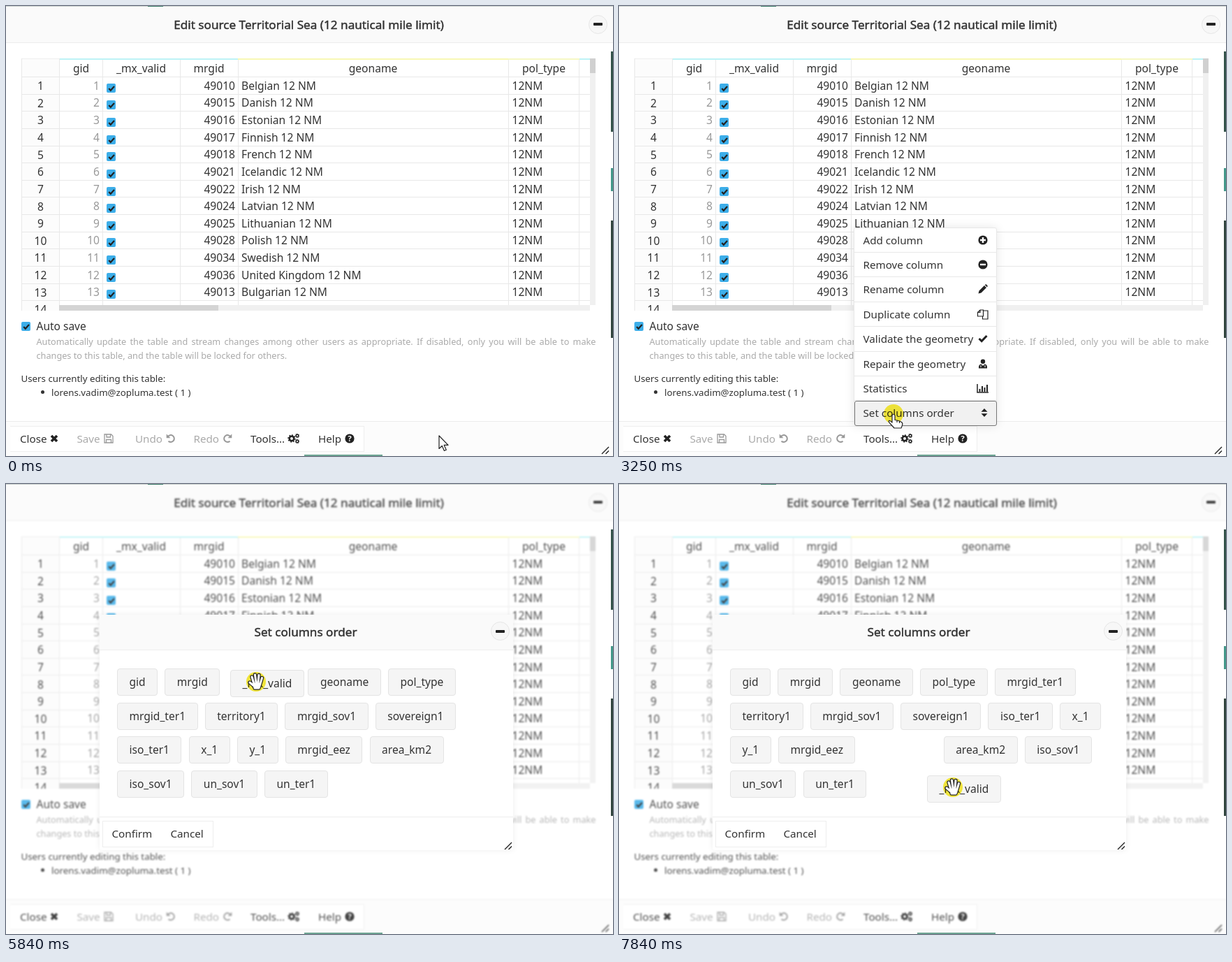
Recreate the animation shown at these times as an HTML page. Size 869x644 px, loop 8 s.

```html
<!DOCTYPE html>
<html lang="en">
<head>
<meta charset="utf-8">
<title>Set columns order</title>
<style>
html, body { margin: 0; width: 100%; height: 100%; overflow: hidden; background: #fff; }
#stage { position: relative; width: 869px; height: 644px; overflow: hidden; color: #333;
  font: 15.6px/24px "Noto Sans", "Open Sans", sans-serif; }
#stage div, #stage svg { position: absolute; box-sizing: border-box; white-space: nowrap; }
#stage svg { overflow: visible; }
.layer { inset: 0; }
.title { font-size: 17.15px; -webkit-text-stroke: .45px #333; }
.small { font-size: 15.2px; }
.check { width: 13px; height: 13px; background: #3daee9; border-radius: 2px; }
.round { border: 1px solid #e6e6e6; border-radius: 50%; background: #f7f7f7; }
.btn { border: 1px solid #eee; border-left-width: 0; background: #fff; }
.chip { height: 39px; line-height: 37px; padding: 0 16.5px; border: 1px solid #e4e4e4;
  border-radius: 4px; background: #f5f5f5; font-size: 15.55px; }
</style>
</head>
<body>
<div id="stage"></div>
<script>
const stage = document.getElementById('stage');

function box(parent, x, y, w, h, css = '', html = '', cls = '') {
  const d = document.createElement('div');
  d.className = cls;
  d.style.cssText = `left:${x}px;top:${y}px;width:${w}px;height:${h}px;${css}`;
  d.innerHTML = html;
  parent.append(d);
  return d;
}

function layer(z) {
  const d = document.createElement('div');
  d.className = 'layer';
  d.style.zIndex = z;
  stage.append(d);
  return d;
}

// y is the vertical middle of the line
function text(parent, x, y, str, align = 'left', css = '', cls = '') {
  const shift = { left: 0, center: 250, right: 500 }[align];
  return box(parent, x - shift, y - 12, 500, 24, `text-align:${align};${css}`, str, cls);
}

function svg(parent, x, y, body, color = '#222') {
  const holder = document.createElement('template');
  holder.innerHTML = `<svg width="1" height="1" style="left:${x}px;top:${y}px;color:${color}">${body}</svg>`;
  const node = holder.content.firstChild;
  parent.append(node);
  return node;
}

const line = (d, w = 1.5) => `<path d="${d}" fill="none" stroke="currentColor" stroke-width="${w}"/>`;
const solid = d => `<path d="${d}" fill="currentColor"/>`;
const disc = `<circle r="6.6" fill="currentColor"/>`;
const gear = (x, y, r) => `<g transform="translate(${x} ${y})" fill="none" stroke="currentColor">
  <circle r="${r * .7}" stroke-width="${r * .55}"/>
  <circle r="${r}" stroke-width="${r * .5}" pathLength="16" stroke-dasharray="1 1"/></g>`;
const turn = line('M-4.4 -2.6A5 5 0 1 1 -3.5 3.8', 2) + solid('M-6.3 -6.5V-.8H-.6Z');

const icons = {
  close: line('M-4 -4L4 4M4 -4L-4 4', 3.6),
  save: line('M-6 -6H3.5L6 -3.5V6H-6ZM-3 -6V-2H2.5V-6M-3.5 6V1.5H3.5V6', 1.3),
  undo: turn,
  redo: `<g transform="scale(-1 1)">${turn}</g>`,
  tools: gear(-3, 0, 4.6) + gear(5, -4, 2.5) + gear(5, 4, 2.5),
  help: disc + '<text y="4" font-size="11" font-weight="700" text-anchor="middle" fill="#fff">?</text>',
  add: disc + '<path d="M-4 0H4M0 -4V4" stroke="#fff" stroke-width="2.4"/>',
  remove: disc + '<path d="M-4 0H4" stroke="#fff" stroke-width="2.4"/>',
  rename: solid('M-6.5 6.5L-5.5 2.5L2 -5L5 -2L-2.5 5.5ZM2.8 -5.8L4.3 -7L7 -4.3L5.8 -2.8Z'),
  copy: line('M-7.5 -2.5L-4 -6H.5V3H-7.5ZM-4 -6V-2.5H-7.5M-.5 3V7H7V-5H.5', 1.2),
  check: line('M-5.5 0L-1.8 3.6L5.5 -4', 3),
  repair: '<circle cy="-3.2" r="3.2" fill="currentColor"/>' +
    solid('M-6 6.5Q-6.5 1 -2.5 .5L0 3L2.5 .5Q6.5 1 6 6.5Z') +
    '<path d="M-3 2V5M3 2V5" stroke="#fff"/>',
  stats: line('M-8 -6V6H8') + line('M-4.5 5V1M-1 5V-3M2.5 5V-1M6 5V-5', 2),
  order: solid('M-4.5 -1.3L0 -6L4.5 -1.3ZM-4.5 1.3L0 6L4.5 1.3Z')
};

const tick = (parent, x, y) => svg(box(parent, x, y, 13, 13, '', '', 'check'), 6.5, 6.5,
  line('M-3.8 0L-1.2 2.8L4 -3', 2.2));

function minusButton(parent, x, y) {
  box(parent, x - 13.5, y - 13.5, 27, 27, '', '', 'round');
  box(parent, x - 6.5, y - 2, 13, 4, 'background:#222;border-radius:1px');
}

const grip = (parent, x, y) => svg(parent, x, y, line('M0 10L10 0M5.5 10L10 5.5', 1.4));
const fill = (parent, x, y, w, h, color) => box(parent, x, y, w, h, 'background:' + color);

// Main window
const main = layer(1);
fill(main, 0, 0, 869, 52, '#fafafa');
fill(main, 0, 52, 869, 1, '#ececec');
text(main, 433.5, 27.2, 'Edit source Territorial Sea (12 nautical mile limit)', 'center', '', 'title');
minusButton(main, 847, 26);

const table = box(main, 22, 75, 822, 361, 'overflow:hidden');
const grid = box(table, -22, -75, 869, 644);
const rowTop = i => 102 + 24.63 * i;
fill(grid, 22, 75, 54, 361, '#fcfcfc');
fill(grid, 22, 75, 814, 1, '#eee');
for (const x of [22, 76, 138, 249, 332, 719, 820]) fill(grid, x, 75, 1, 361, '#e8e8e8');
for (let i = 0; i < 14; i++) fill(grid, 22, Math.round(rowTop(i)) - 1, 814, 1, '#e8e8e8');
fill(grid, 77, 75, 255, 2, '#bdf3f6');
fill(grid, 332, 75, 387, 2, '#f8f8b4');
fill(grid, 719, 75, 102, 2, '#f6f8c4');
fill(grid, 821, 75, 15, 2, '#bdf3f6');

const heads = { gid: 107.5, _mx_valid: 193.5, mrgid: 290.5, geoname: 525.5, pol_type: 770 };
for (const name in heads) text(grid, heads[name], 88.7, name, 'center');

const rows = `49010 Belgian,49015 Danish,49016 Estonian,49017 Finnish,49018 French,49021 Icelandic,49022 Irish,
49024 Latvian,49025 Lithuanian,49028 Polish,49034 Swedish,49036 United Kingdom,49013 Bulgarian`.split(',');
rows.forEach((row, i) => {
  const y = rowTop(i) + 11.8, [, id, name] = row.trim().match(/^(\d+) (.+)/);
  text(grid, 49.5, y + .3, i + 1, 'center');
  text(grid, 134, y, i + 1, 'right', 'color:#999');
  tick(grid, 144, Math.round(y - 3));
  text(grid, 328, y, id, 'right');
  text(grid, 337, y, name + ' 12 NM');
  text(grid, 724.5, y, '12NM');
});
text(grid, 49.5, rowTop(13) + 12, 14, 'center');
fill(grid, 76, 428, 768, 8, '#f0f0f0');
fill(grid, 76, 428, 228, 8, '#d4d4d4');
fill(grid, 836, 75, 8, 353, '#f0f0f0');
fill(grid, 836, 75, 8, 21, '#d0d0d0');
fill(grid, 836, 428, 8, 8, '#fff');

tick(main, 22, 452);
text(main, 43.5, 458, 'Auto save', 'left', 'font-size:15.5px');
const note = 'font-size:12.7px;color:#aaa;width:801px;';
text(main, 43.5, 480, 'Automatically update the table and stream changes among other users as appropriate. ' +
  'If disabled, only you will be able to make', 'left', note + 'white-space:normal;text-align-last:justify');
text(main, 43.5, 500, 'changes to this table, and the table will be locked for others.', 'left', note);
text(main, 21.5, 532.5, 'Users currently editing this table:', 'left', 'font-size:13.3px');
box(main, 50, 550, 5, 5, 'background:#333;border-radius:50%');
text(main, 65, 552.5, 'lorens.vadim@zopluma.test ( 1 )', 'left', 'font-size:13.3px');

fill(main, 0, 594, 869, 1, '#ececec');
fill(main, 0, 595, 869, 49, '#fcfcfc');
const buttons = [
  ['Close', 6, 88, 20, 'close', 69], ['Save', 88, 171, 101.5, 'save', 147], ['Undo', 171, 255, 185, 'undo', 236],
  ['Redo', 255, 336, 268.5, 'redo', 317], ['Tools...', 336, 433, 350, 'tools', 412], ['Help', 433, 512, 447, 'help', 492]
].map(([label, x0, x1, tx, icon, ix]) => {
  const off = /Save|Undo|Redo/.test(label);
  const b = box(main, x0, 601, x1 - x0 + 1, 37, '', '', 'btn');
  text(main, tx, 618.5, label, 'left', off ? 'color:#aaa' : '', 'small');
  svg(main, ix, 618.5, icons[icon], off ? '#999' : '#222');
  return { b, x0, x1 };
});
grip(main, 853, 631);

// Page behind the window, showing at its edges
const edge = layer(2);
fill(edge, 0, 0, 869, 1, '#ccd2cf');
fill(edge, 203, 0, 22, 1, '#3b7a68');
fill(edge, 866, 65, 3, 115, '#33524a');
fill(edge, 866, 232, 3, 33, '#43988a');
fill(edge, 866, 307, 3, 168, '#30443e');
fill(edge, 427, 642, 112, 2, '#6da392');

// Tools menu
const menu = layer(3);
box(menu, 336, 317, 205, 284, 'background:#fff;border:1px solid #e8e8e8;border-radius:3px;box-shadow:0 0 14px rgba(0,0,0,.1)');
const lastItem = box(menu, 337, 565, 204, 36);
[['Add column', 'add'], ['Remove column', 'remove'], ['Rename column', 'rename'], ['Duplicate column', 'copy'],
 ['Validate the geometry', 'check'], ['Repair the geometry', 'repair'], ['Statistics', 'stats'],
 ['Set columns order', 'order']].forEach(([label, icon], i) => {
  const y = 334.5 + 35.4 * i;
  if (i) fill(menu, 337, Math.round(y - 18), 203, 1, '#e8e8e8');
  text(menu, 349.5, y, label, 'left', '', 'small');
  svg(menu, icon === 'order' ? 523 : 520.5, y, icons[icon]);
});

// Dialog
const dialog = layer(4);
box(dialog, 134, 187, 592, 337, 'background:#fff;border-radius:3px;box-shadow:0 0 8px rgba(0,0,0,.07)');
fill(dialog, 134, 187, 592, 50, '#fafafa');
fill(dialog, 134, 237, 592, 1, '#eee');
text(dialog, 429, 211.5, 'Set columns order', 'center', '', 'title');
minusButton(dialog, 707, 210.5);
fill(dialog, 134, 476, 592, 1, '#eee');
box(dialog, 138, 482, 85, 38, 'border-left-width:1px', '', 'btn');
box(dialog, 222, 482, 75, 38, '', '', 'btn');
text(dialog, 151.5, 500, 'Confirm', 'left', '', 'small');
text(dialog, 235.5, 500, 'Cancel', 'left', '', 'small');
const focusRing = box(dialog, 139, 483, 83, 35, 'border:2px solid #111;border-radius:4px');
grip(dialog, 714, 513);

const others = ('gid mrgid geoname pol_type mrgid_ter1 territory1 mrgid_sov1 sovereign1 iso_ter1 x_1 y_1 ' +
  'mrgid_eez area_km2 iso_sov1 un_sov1 un_ter1').split(' ');
const moved = '_mx_valid';
const chips = {};
for (const name of [...others, moved]) {
  const c = box(dialog, 0, 0, 0, 0, '', name, 'chip');
  c.style.width = c.style.height = '';
  chips[name] = { c, w: c.getBoundingClientRect().width };
}

// Wrapping flow with the moved chip's slot at the given index
function flow(slot) {
  const order = [...others], spots = {};
  order.splice(slot, 0, moved);
  let x = 159, y = 264;
  for (const name of order) {
    const w = chips[name].w;
    if (x + w > 712) { x = 159; y += 48.6; }
    spots[name] = [x, y];
    x += w + 10.2;
  }
  return spots;
}

// Pointer shapes
const top_ = layer(5);
const glow = box(top_, 0, 0, 28, 28, 'background:#faee3c;border-radius:50%;mix-blend-mode:multiply');
top_.style.mixBlendMode = 'multiply';
const pointerLayer = layer(6);
const outline = 'fill="#fff" stroke="#222" stroke-width="1.2" stroke-linejoin="round"';
const fingers = 'M-3 3L-6 -7M0 1L-1.5 -10M3 1L4 -9.5M6 3L8.5 -5.5M-3 6L-9 1M-3 3H6L4 9H-2Z';
const fingerPath = (color, w) =>
  `<path d="${fingers}" fill="${color}" stroke="${color}" stroke-width="${w}" stroke-linecap="round" stroke-linejoin="round"/>`;
const pointers = {
  arrow: `<path d="M0 0V18.5L4.3 14.5L7.4 21.5L10.3 20.2L7.2 13.4H13Z" ${outline}/>`,
  hand: `<path d="M-2 2Q0 -1.5 2 2V8.5L5 9L8.5 10L11.5 11.5Q13.5 13 12.5 16L11 20H1L-4 14.5Q-8 10.5 -6.5 9.5Q-5 9 -2 12Z
    M5 9V12M8.5 10V13" ${outline}/>`,
  grab: fingerPath('#222', 5.4) + fingerPath('#fff', 3)
};
for (const k in pointers) pointers[k] = svg(pointerLayer, 0, 0, pointers[k]);

// time, x, y, shape from that time on
const path = [
  [0, 620, 615, 'arrow'], [230, 600, 613, 'arrow'], [435, 530, 608, 'arrow'], [640, 450, 612, 'hand'],
  [845, 400, 620, 'hand'], [1050, 383, 622, 'hand'], [2450, 386, 612, 'hand'], [2650, 390, 592, 'hand'],
  [2850, 393, 584, 'hand'], [3440, 393, 584, 'arrow'], [3640, 386, 390, 'arrow'], [3830, 376, 199, 'arrow'],
  [4040, 470, 232, 'arrow'], [4230, 576, 270, 'grab'], [4430, 520, 284, 'grab'], [4630, 440, 288, 'grab'],
  [4830, 360, 286, 'grab'], [5030, 300, 283, 'grab'], [5220, 264, 281, 'grab'], [5640, 299, 282, 'grab'],
  [5840, 358, 283, 'grab'], [6650, 374, 297, 'grab'], [6850, 408, 332, 'grab'], [7040, 441, 369, 'grab'],
  [7240, 462, 386, 'grab'], [7440, 482, 402, 'grab'], [7640, 486, 414, 'grab'], [7840, 478, 434, 'grab']
];
// time, chip x, chip y, old slot, new slot, progress of the reflow
const drags = [
  [5640, 262, 265, 1, 2, .3], [5840, 321, 266, 1, 2, 1], [6650, 337, 280, 1, 2, 1], [6850, 366, 309, 1, 2, 1],
  [7040, 391, 339, 2, 7, .112], [7240, 422, 366, 2, 7, 1], [7440, 444, 384, 7, 12, .5],
  [7640, 449, 397, 7, 12, 1], [7840, 441, 417, 7, 12, 1]
];
const flows = {};
for (const slot of [1, 2, 7, 12]) flows[slot] = flow(slot);
const at = (list, t) => list.filter(k => k[0] <= t).pop();
const show = (node, on) => node.style.visibility = on ? '' : 'hidden';
const within = (t, a, b) => t >= a && t < b;

function draw(t) {
  const inMenu = within(t, 2060, 3440), inDialog = t >= 3440;
  main.style.filter = inDialog ? 'blur(1.2px) opacity(.85)' : inMenu ? 'blur(.7px)' : '';
  menu.style.display = inMenu ? '' : 'none';
  dialog.style.display = inDialog ? '' : 'none';
  focusRing.style.display = t < 5420 ? '' : 'none';

  const [, x, y, shape] = at(path, t);
  for (const k in pointers) show(pointers[k], k === shape);
  pointers[shape].style.left = x + 'px';
  pointers[shape].style.top = y + 'px';
  glow.style.left = x - 14 + 'px';
  glow.style.top = y - 14 + 'px';
  show(glow, within(t, 1860, 2060) || within(t, 3250, 3440) || t >= 5420);

  for (const { b, x0, x1 } of buttons)
    b.style.background = t < 2060 && shape === 'hand' && x >= x0 && x < x1 ? '#eee' : '';
  lastItem.style.background = t >= 2650 ? '#f1f1f1' : '';
  lastItem.style.border = t >= 3250 ? '1px solid #777' : '';
  lastItem.style.borderRadius = '3px';

  const [, cx, cy, from, to, p] = at(drags, t) || [0, ...flows[1][moved], 1, 1, 1];
  for (const name in chips) {
    const a = flows[from][name], b = flows[to][name];
    const spot = name === moved ? [cx, cy] : a.map((v, i) => v + (b[i] - v) * p);
    chips[name].c.style.left = spot[0] + 'px';
    chips[name].c.style.top = spot[1] + 'px';
  }
}

const start = performance.now();
function tickFrame() {
  draw((performance.now() - start) % 8000);
  requestAnimationFrame(tickFrame);
}
tickFrame();
</script>
</body>
</html>
```
